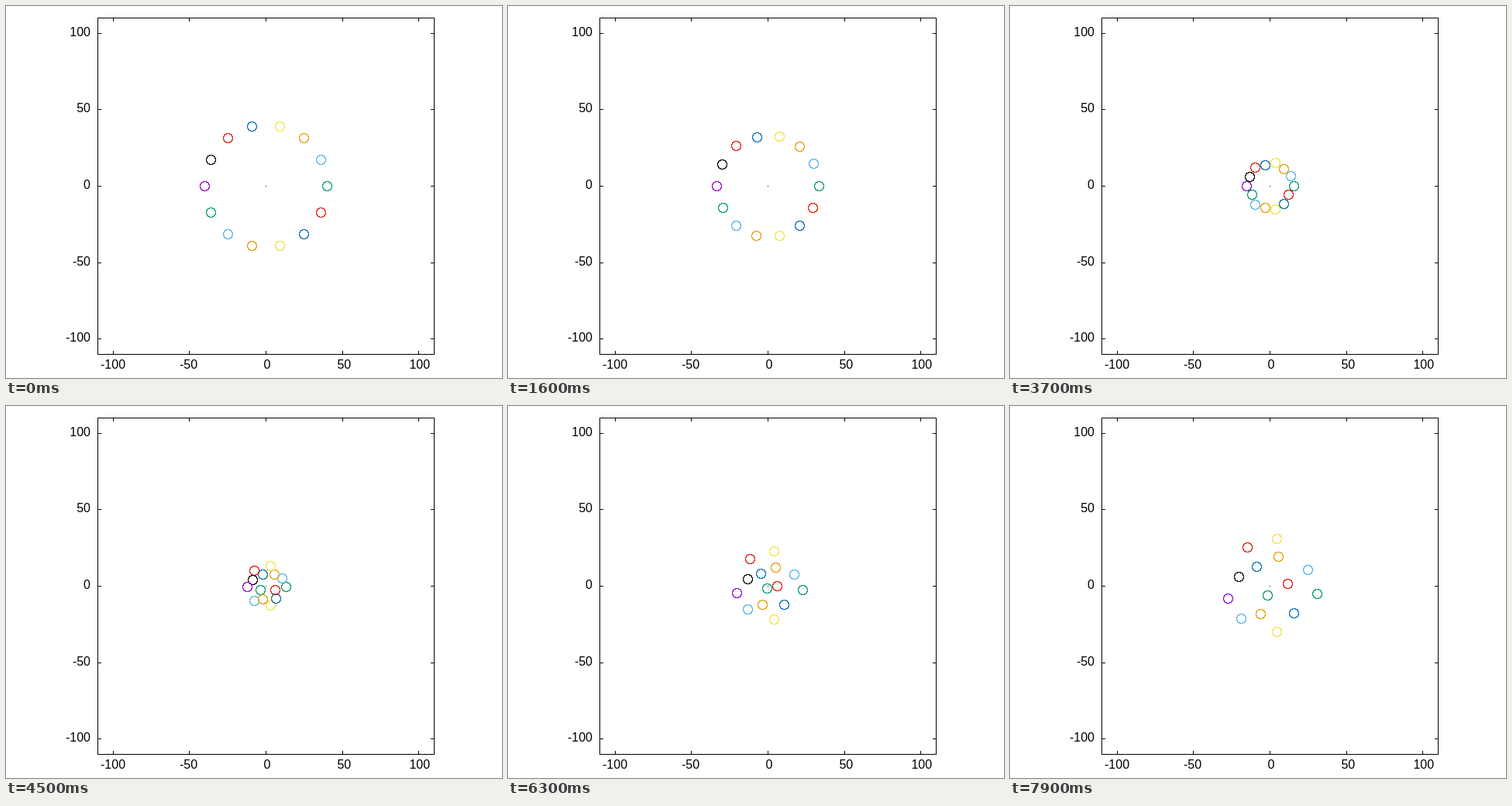
These frames come from a looping animation (640 by 480 pixels, 8 s). An HTML page with a canvas:

```html
<!DOCTYPE html>
<html lang="en">
<head>
<meta charset="utf-8">
<title>Ring of particles</title>
<style>
html, body { margin: 0; width: 100%; height: 100%; overflow: hidden; background: #fff; }
canvas { display: block; }
</style>
</head>
<body>
<canvas id="stage" width="640" height="480"></canvas>
<script>
const ctx = document.getElementById('stage').getContext('2d');
const CX = 335.5, CY = 232.5, UNIT = 434 / 220;
const STEP = 100, STEPS = 80;
const PALETTE = ['#9400d3', '#009e73', '#56b4e9', '#e69f00', '#f0e442', '#0072b2', '#e51e10', '#000'];

// Per particle, counter-clockwise from the right: degrees of deflection
// and pixels lost to the leading particles in the collision.
const TURN = [-9, -2, 23, 4.5, 21.5, -8, 9.5, 16.5, 52.5, -3, -6, -4, 3.5, 32];
const LAG = [0, 9, 22.5, 0, 32, 4, 20.5, 5.5, 49.5, 6.5, 24, 2, 15.5, 39];

// Shared motion: radius of the leading particles and share of the collision felt.
const TIMES = [0, 16, 24, 37, 53, 63, 79];
const radius = spline([40 * UNIT, 66, 53, 31, 31, 45.5, 62]);
const impact = spline([0, 0.03, 0.06, 0.11, 0.65, 0.86, 1]);

// Smooth cubic spline: at rest at the start, free at the end.
function spline(values) {
  const n = TIMES.length - 1;
  const h = [], d = [], m = new Array(n + 1).fill(0);
  for (let i = 0; i < n; i++) {
    h[i] = TIMES[i + 1] - TIMES[i];
    d[i] = (values[i + 1] - values[i]) / h[i];
  }
  for (let pass = 0; pass < 40; pass++) {
    for (let i = 1; i < n; i++) {
      const a = 1 / h[i - 1], b = 1 / h[i];
      m[i] = (3 * (d[i - 1] * a + d[i] * b) - m[i - 1] * a - m[i + 1] * b) / (2 * (a + b));
    }
    m[n] = (3 * d[n - 1] - m[n - 1]) / 2;
  }
  return t => {
    let i = 0;
    while (i < n - 1 && t > TIMES[i + 1]) i++;
    const u = (t - TIMES[i]) / h[i], v = 1 - u;
    return values[i] * v * v * (1 + 2 * u) + values[i + 1] * u * u * (3 - 2 * u)
      + h[i] * u * v * (m[i] * v - m[i + 1] * u);
  };
}

function line(x1, y1, x2, y2) {
  ctx.beginPath();
  ctx.moveTo(x1, y1);
  ctx.lineTo(x2, y2);
  ctx.stroke();
}

function drawAxes() {
  ctx.strokeStyle = ctx.fillStyle = '#000';
  ctx.lineWidth = 1;
  ctx.font = '16px "Liberation Sans", Arial, sans-serif';
  ctx.strokeRect(118.5, 15.5, 434, 434);
  for (let value = -100; value <= 100; value += 50) {
    const x = Math.floor(CX + value * UNIT), y = Math.floor(CY - value * UNIT);
    line(x + 0.5, 449.5, x + 0.5, 445);
    line(x + 0.5, 15.5, x + 0.5, 20);
    line(118.5, y + 0.5, 123, y + 0.5);
    line(552.5, y + 0.5, 548, y + 0.5);
    // Positive labels keep a blank in place of the sign.
    const label = value < 0 ? String(value) : ' ' + value;
    const width = ctx.measureText(label).width;
    ctx.fillText(label, Math.round(x - width / 2), 468);
    ctx.fillText(label, 109 - width, y + 4);
  }
}

// Crisp one-pixel ring around a whole pixel.
function ring(x, y, color) {
  ctx.fillStyle = color;
  for (let deg = 0; deg < 360; deg += 3) {
    const a = deg * Math.PI / 180;
    ctx.fillRect(x + Math.round(6 * Math.cos(a)), y + Math.round(6 * Math.sin(a)), 1, 1);
  }
}

function drawParticle(k, t) {
  const hit = impact(t);
  const angle = (k * 360 / TURN.length + TURN[k] * hit * hit) * Math.PI / 180;
  const r = radius(t) - LAG[k] * hit;
  const x = Math.floor(CX + r * Math.cos(angle));
  const y = Math.floor(CY - r * Math.sin(angle));
  ring(x, y, PALETTE[(k + 1) % PALETTE.length]);
}

function draw(now) {
  const t = Math.floor(Math.max(0, now) / STEP) % STEPS;
  ctx.fillStyle = '#fff';
  ctx.fillRect(0, 0, 640, 480);
  drawAxes();
  ctx.fillRect(335, 232, 1, 1);
  for (let k = 0; k < TURN.length; k++) drawParticle(k, t);
  requestAnimationFrame(draw);
}

draw(performance.now());
</script>
</body>
</html>
```
